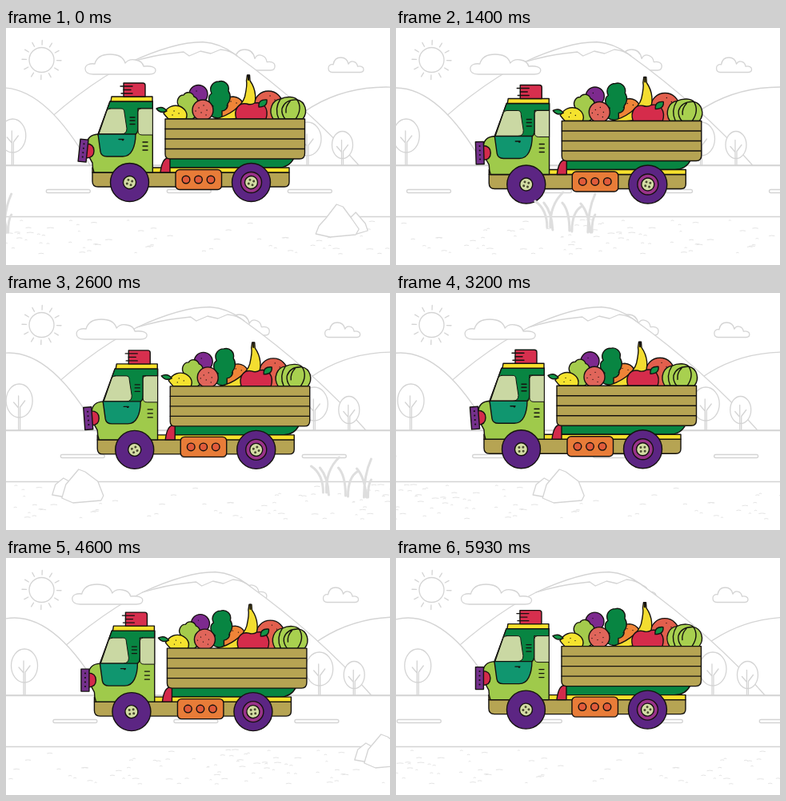
An HTML page for the animation above (6000 ms loop, 480x297 px).

```html
<!DOCTYPE html>
<html lang="en">
<head>
<meta charset="utf-8">
<title>Produce truck</title>
<style>
html, body { margin: 0; width: 100%; height: 100%; overflow: hidden; background: #fff; }
svg { display: block; width: 100vw; height: 100vh; }
.bg { fill: #fff; stroke: #d4d4d4; stroke-width: 1.3; stroke-linejoin: round; stroke-linecap: round; }
.line { fill: none; }
.ink { stroke: #15120f; stroke-width: 1.4; stroke-linejoin: round; stroke-linecap: round; }
</style>
</head>
<body>
<svg viewBox="0 0 480 297" preserveAspectRatio="none">
  <defs>
    <path id="cloud" vector-effect="non-scaling-stroke" d="M10 25C3 25 0 22 0 18C0 13 6 11 12 12C14 4 21 0 31 0C41 0 48 4 50 11C53 7 58 6 63 7C69 8 72 11 73 15C82 14 88 16 88 20C88 23 85 25 80 25Z"/>
    <g id="hub">
      <circle r="8" fill="#d3dca4"/>
      <g fill="#4a4a30" stroke="none">
        <circle cx="-2.5" cy="-2.5" r="1.5"/><circle cx="2.5" cy="-2.5" r="1.5"/>
        <circle cx="-2.5" cy="2.5" r="1.5"/><circle cx="2.5" cy="2.5" r="1.5"/>
      </g>
    </g>
  </defs>

  <g class="bg">
    <g id="sun"><circle cx="44.500" cy="40" r="15.500"/></g>
    <g id="cloudMid"><use href="#cloud" transform="translate(278 27) scale(.66 1.04)"/></g>
    <g id="land">
      <path d="M310 172C350 110 405 74 475 74C530 74 590 110 630 172Z"/>
      <path d="M20 146Q90 76 155 43Q210 17.500 246 17.500Q268 19 286 33Q375 97 441 172L20 172Z"/>
      <path class="line" d="M155 43Q185 34 205 32L222 30L229 35L243 29L256 32L268 27Q281 28 289 35"/>
      <path d="M-115 172Q-60 75 -5 75Q50 75 105 172Z"/>
    </g>
    <path d="M-5 172.500H485V300H-5Z"/>
    <g id="trees"></g>
    <g id="cloudBig"><use href="#cloud" transform="translate(99 33)"/></g>
    <g id="cloudSmall"><use href="#cloud" transform="translate(403 37) scale(.5 .74)"/></g>
    <path class="line" d="M-5 236.500H485"/>
    <g id="dashes"></g>
    <g id="specks" class="line" stroke="#e4e4e4" stroke-width="1"></g>
  </g>

  <g id="truck" class="ink">
    <g id="load">
      <ellipse cx="328" cy="97" rx="18" ry="18" fill="#e25f4d"/>
      <circle cx="240.500" cy="83" r="11.500" fill="#7d2a8e"/>
      <path fill="#ef8437" d="M268 114Q265 86 284 86Q300 87 299 114Z"/>
      <path fill="#088542" d="M260 112C252 109 254 101 259 98C252 94 252 85 257 82C253 74 259 67 266 67C273 65 280 71 278 79C282 85 280 92 277 95C278 101 273 104 270 104L270 114Z"/>
      <path fill="#a4cb4c" d="M222 114C214 110 213 103 217 99C211 92 216 84 222 84C225 79 233 80 235 86C241 88 241 96 238 99C241 106 238 112 233 114Z"/>
      <circle cx="246" cy="103" r="13" fill="#e0655a"/>
      <path fill="#f3dd30" d="M301.500 59L304.500 59L305 66C312 76 315 91 307 104C301 112 286 116 261 114C279 110 295 98 298.500 86C300.500 77 301.500 70 300.500 66Z"/>
      <path stroke-width="2" d="M303 59.500V65"/>
      <path fill="#f5e32e" d="M197 107C202 98 210 96 217 98C224 101 228 107 225 114H203Q200 111 197 107Z"/>
      <path fill="#119347" d="M201 104Q193 108 188 101Q196 97 201 104Z"/>
      <path fill="#d52c4b" d="M288 114C284 102 291 93 301 95Q306 97 311 94C322 92 329 101 325 114Z"/>
      <path fill="#119347" d="M316 99Q315 89 326 90Q327 99 316 99Z"/>
      <path fill="#a8d04f" d="M334 114C327 103 333 90 343 89C351 85 361 86 364 90C374 92 378 105 371 114Z"/>
      <path class="line" d="M343 89Q335 101 341 114M364 90Q349 89 345 101Q344 108 349 114M364 90Q371 101 362 114M355 92Q349 98 350 106"/>
      <path stroke-width="1.300" d="M241 100h.1M247 97h.1M251 103h.1M244 106h.1M250 109h.1M237 104h.1M210 104h.1M216 107h.1M208 109h.1M281 92h.1M288 94h.1M276 97h.1M238 79h.1M330 85h.1M336 90h.1"/>
    </g>

    <path fill="#088542" d="M203 163H360Q354 175 340 175H203Z"/>
    <path fill="#b6a453" d="M108 181H354V193Q354 199 348 199H115Q108 199 108 192Z"/>
    <path fill="#f7e12d" d="M108 175H354V181H108Z"/>
    <path fill="#d32a4b" d="M193 181Q195 164 202 163H205V181Z"/>
    <path fill="#b6a453" d="M199 114H373.500V157Q373.500 164 367 164H205Q199 164 199 158Z"/>
    <path class="line" d="M199 126.500H373M199 139H373M199 151.500H373"/>

    <path fill="#9fca4b" d="M130 92H183.300V181H110Q108 176 108 169Q101 158 101 145Q102 134 115 133Z"/>
    <path fill="#088542" d="M130 92H183.300V101H165V125Q165 134 159 134H115Z"/>
    <path fill="#cad8a3" stroke-width="1" d="M130 101H144Q148 101 148 106L151 126Q151 133 144 133H116L126 104Q127 101 130 101Z"/>
    <path fill="#cad8a3" stroke-width="1" d="M168 101H183.300V134H170Q165 134 165 129V105Q165 101 168 101Z"/>
    <path fill="#10966f" d="M115 133H162Q162 145 158 153Q154 161 146 161H126Q119 161 118 155Z"/>
    <path class="line" d="M141 139.500H147M145.500 140.500h1M171 143H177M171 148H177M171 153H177M155 112H161M155 116H161M155 120.500H161"/>
    <path fill="#f7e12d" d="M132 86H183V92H131Z"/>
    <path fill="#d72f4e" d="M147 69H171Q174 69 174 72V86H147Z"/>
    <path class="line" d="M143 73H158M147 77.500H156M144 82H158"/>
    <path fill="#d32a4b" d="M100 145Q110 145 110 154Q110 163 100 163Z"/>
    <g id="plate">
      <path fill="#74308c" d="M91.500 140H101.500V168H91.500Z"/>
      <path stroke-width="2" d="M96.500 145.500h.1M96.500 151h.1M96.500 156.500h.1M96.500 162h.1"/>
    </g>

    <rect x="212" y="177.500" width="57.500" height="25" rx="5" fill="#e87c38"/>
    <g fill="#e05a3a"><circle cx="225" cy="190" r="4.800"/><circle cx="240.500" cy="190" r="4.800"/><circle cx="256" cy="190" r="4.800"/></g>

    <g transform="translate(154.500 193.500)">
      <circle r="24" fill="#5c2583"/><g class="spin"><use href="#hub"/></g>
    </g>
    <g transform="translate(306.500 193.500)">
      <circle r="24" fill="#5c2583"/><circle r="13" fill="#9b338b"/><g class="spin"><use href="#hub"/></g>
    </g>
  </g>

  <g class="bg">
    <g id="rockA">
      <path d="M428 240L437 231L449 245L452 254L438 258Z"/>
      <path d="M387 258L391 248L400 238L413 221L421 224L432 239L441 252L437 259L405 262Z"/>
    </g>
    <g id="rockB">
      <path d="M171 253L175 240L185 232L194 237L188 256Z"/>
      <path d="M183 257L188 240L204 221L212 224L228 236L235 254L232 260L197 263Z"/>
    </g>
    <g id="grass" class="line" stroke-width="3" stroke="#dedede">
      <path d="M97 250Q97 227 82 217M101 250Q100 222 117 206M104 253Q103 231 93 219M125 254Q125 229 116 219M128 255Q128 230 141 223M148 256Q148 228 157 208M151 256Q149 231 139 220M153 256Q153 240 157 234"/>
    </g>
  </g>
</svg>
<script>
const LOOP = 6000;
const $ = id => document.getElementById(id);
const move = (id, x, y = 0) => $(id).setAttribute("transform", `translate(${x.toFixed(2)} ${y.toFixed(2)})`);

function add(parent, tag, attrs) {
  const el = document.createElementNS("http://www.w3.org/2000/svg", tag);
  for (const k in attrs) el.setAttribute(k, attrs[k]);
  return parent.appendChild(el);
}

let seed = 41;
const rand = () => (seed = (seed * 16807) % 2147483647) / 2147483647;

for (let i = 0; i < 12; i++) {
  const a = i * Math.PI / 6 + 0.03, c = Math.cos(a), s = Math.sin(a);
  add($("sun"), "path", { d: `M${44.5 + 19 * c} ${40 + 19 * s}l${5.5 * c} ${5.5 * s}` });
}

function tree(x, cy, rx, ry) {
  add($("trees"), "ellipse", { cx: x, cy, rx, ry });
  add($("trees"), "path", {
    class: "line",
    d: `M${x - 1} 172V${cy - 6}M${x + 1} 172V${cy + 8}M${x - 1} ${cy + 9}l-6 -7M${x + 1} ${cy + 8}l6 -8`
  });
}
tree(8.3, 135, 16.5, 21);
tree(377, 139, 17, 21);
tree(420.5, 146.5, 13, 17);

const GAP = 151, FIELD = 560;
for (let i = -2; i < 3; i++) {
  add($("dashes"), "rect", { x: 50 + i * GAP, y: 202.5, width: 55, height: 4, rx: 2 });
}

let d = "";
for (let i = 0; i < 85; i++) {
  const x = rand() * FIELD, y = 240 + rand() * 44, w = 2 + rand() * 6;
  for (const k of [0, FIELD]) d += `M${(x - k).toFixed(1)} ${y.toFixed(1)}q${w / 2} -1 ${w} 0`;
}
add($("specks"), "path", { d });

// Smooth curve through [time, value] points
function curve(p) {
  const n = p.length - 1;
  const slope = i => {
    const a = p[Math.max(i - 1, 0)], b = p[Math.min(i + 1, n)];
    return (b[1] - a[1]) / (b[0] - a[0]);
  };
  return t => {
    let i = 0;
    while (i < n - 1 && t > p[i + 1][0]) i++;
    const [t0, a] = p[i], [t1, b] = p[i + 1], h = t1 - t0, u = (t - t0) / h, v = 1 - u;
    return a * (1 + 2 * u) * v * v + b * u * u * (3 - 2 * u) + h * u * v * (slope(i) * v - slope(i + 1) * u);
  };
}
const swayX = curve([[0, 0], [870, 5.5], [2000, 9.6], [3200, 2], [4070, 0.5], [5130, 5], [6000, 8.2]]);
const swayY = curve([[0, 0], [870, 1.7], [2000, 3], [3200, 2.3], [4070, 0.3], [5130, -2], [6000, -3.5]]);
const plateTilt = curve([[0, 6], [870, 0], [2000, -3], [3200, -4.5], [4070, -0.5], [6000, 0]]);

const spins = document.querySelectorAll(".spin");

function draw(t) {
  const s = t / 1000;
  const drift = Math.sin(Math.PI * t / 12200);
  move("cloudBig", -17.5 * drift);
  move("cloudMid", -11 * drift);
  move("cloudSmall", -7 * drift);
  move("land", 3.4 * s);
  move("trees", 3.2 * s);
  move("dashes", (297.3 * s) % GAP);
  move("specks", (189 * s) % FIELD);
  move("rockA", 189 * s);
  move("rockB", 189 * (s - 3.2));
  move("grass", 173 * (s - 0.87));
  move("truck", swayX(t), swayY(t));
  $("plate").setAttribute("transform", `rotate(${plateTilt(t).toFixed(2)} 100 154)`);
  for (const el of spins) el.setAttribute("transform", `rotate(${(20 - 710 * s).toFixed(1)})`);
}

const start = performance.now();
function frame() {
  draw((performance.now() - start) % LOOP);
  requestAnimationFrame(frame);
}
draw(0);
requestAnimationFrame(frame);
</script>
</body>
</html>
```
